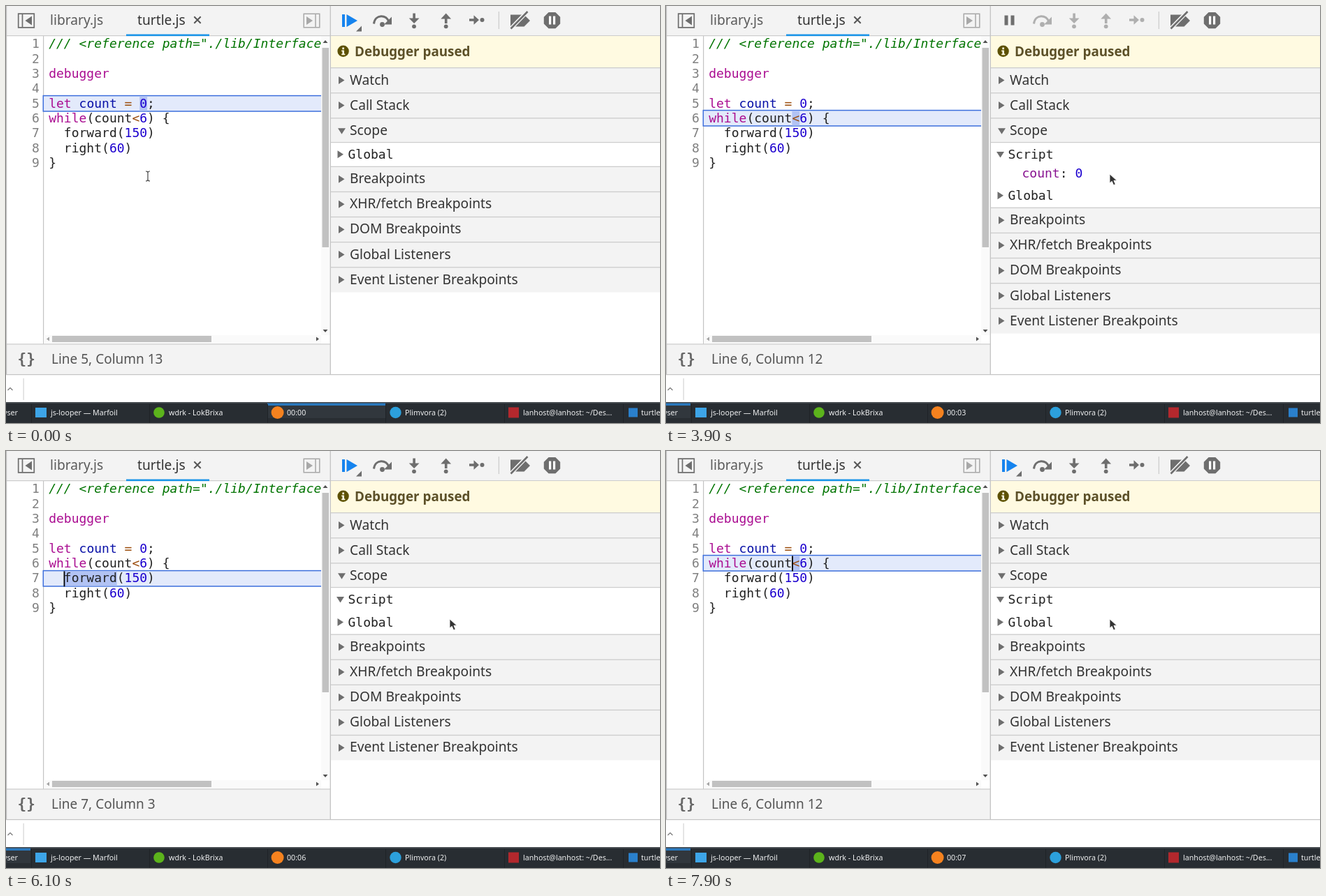
These frames come from a looping animation (936x598 px, 8000 ms). An HTML page:

```html
<!DOCTYPE html>
<html lang="en">
<head>
<meta charset="utf-8">
<title>Debugger stepping</title>
<style>
html, body { margin: 0; width: 100%; height: 100%; overflow: hidden; background: #fff; }
svg { display: block; }
text { white-space: pre; }
.ui { font: 19.2px "Noto Sans", sans-serif; fill: #333; }
.code { font: 18px "DejaVu Sans Mono", monospace; fill: #222; }
.task { font: 10.67px "Noto Sans", sans-serif; fill: #eff0f1; }
.kw { fill: #aa0d91; }
.num { fill: #1c00cf; }
.def { fill: #0a12a8; }
.op { fill: #9a4a08; }
.com { fill: #007400; font-style: oblique; }
.prop { fill: #881391; }
</style>
</head>
<body>
<svg id="stage" width="936" height="598" viewBox="0 0 936 598"></svg>
<script>
const LOOP = 8000, CHAR = 10.836, CODE_X = 61.2, PITCH = 21.33;

// Timelines: [start in ms, value]
const lines = [[0, 5], [900, 6], [4000, 7], [4300, 8], [4500, 6], [4700, 7], [5000, 8],
  [5100, 6], [5300, 7], [5600, 8], [5800, 6], [6000, 7], [6300, 8], [6500, 6],
  [6600, 7], [6800, 8], [7000, 6], [7200, 7], [7400, 8], [7900, 6]];
const scopes = [[0, 'none'], [900, 'full'], [5100, 'bare'], [5200, 'full'],
  [6000, 'bare'], [6200, 'full'], [7900, 'bare']];
const running = [[0, 0], [800, 1], [900, 0], [3900, 1], [4000, 0], [4600, 1],
  [4700, 0], [4900, 1], [5000, 0]];
const carets = [[0, 0], [900, 1], [1400, 0], [1900, 1], [2400, 0], [4000, 1]];
const seconds = [0, 1400, 2200, 3200, 4100, 5200, 6100, 7000].map((t, i) => [t, i]);
const mouse = [[0, [203, 244]], [1500, [228, 245]], [1600, [305, 246]], [1700, [395, 247]],
  [1800, [490, 247]], [1900, [570, 247]], [2000, [607, 247]], [2100, [588, 247]],
  [2200, [561, 247]], [2300, [556, 238]], [2400, [554, 229]], [3200, [602, 234]],
  [3300, [635, 241]]];

// Per code line: first column and length of the marked token
const tokens = { 5: [12, 1], 6: [11, 1], 7: [2, 7], 8: [2, 5] };
const scopeShift = { none: 0, bare: 32.8, full: 59 };

const code = [
  '<tspan class="com">/// &lt;reference path="./lib/Interface</tspan>',
  '',
  '<tspan class="kw">debugger</tspan>',
  '',
  '<tspan class="kw">let</tspan> <tspan class="def">count</tspan> <tspan class="op">=</tspan> <tspan class="num">0</tspan>;',
  '<tspan class="kw">while</tspan>(count<tspan class="op">&lt;</tspan><tspan class="num">6</tspan>) {',
  '  forward(<tspan class="num">150</tspan>)',
  '  right(<tspan class="num">60</tspan>)',
  '}'
];

const rect = (x, y, w, h, fill, more = '') =>
  `<rect x="${x}" y="${y}" width="${w}" height="${h}" fill="${fill}" ${more}/>`;
const dot = (x, y, r, fill) => `<circle cx="${x}" cy="${y}" r="${r}" fill="${fill}"/>`;
const path = (d, more = 'fill="#6e6e6e"') => `<path d="${d}" ${more}/>`;
const text = (x, y, s, cls, more = '') => `<text x="${x}" y="${y}" class="${cls}" ${more}>${s}</text>`;
const stroke = (c, w) => `fill="none" stroke="${c}" stroke-width="${w}"`;
const closed = (x, y) => path(`M${x} ${y - 5.5}l8.5 5.5l-8.5 5.5z`);
const open = (x, y) => path(`M${x} ${y - 4}h11l-5.5 8.5z`);

function header(y, label, isOpen) {
  return rect(465, y, 471, 36, '#f3f3f3') + rect(465, y - .5, 471, 1.3, '#ccc') +
    (isOpen ? open(475, y + 18.5) : closed(476, y + 18)) +
    text(492, y + 24, label, 'ui');
}

function editor() {
  const rows = code.map((s, i) => {
    const y = 60.2 + PITCH * i;
    return text(47.8, y, i + 1, 'code', 'text-anchor="end" style="fill:#808080"') +
      text(CODE_X, y, s, 'code');
  }).join('');
  return rect(53, 43, 1.2, 442, '#c4c4c4') +
    `<clipPath id="clip"><rect x="52" y="43" width="399" height="429"/></clipPath>
    <g clip-path="url(#clip)">
      ${rect(53.3, 0, 420, 22.4, '#e3eafb', 'id="mark" stroke="#3d6fdc" stroke-width="1.5"')}
      ${rect(0, 0, 0, 21.5, '#b2c3f4', 'id="token"')}
    </g>
    <g clip-path="url(#code)">${rows}</g>
    <clipPath id="code"><rect x="0" y="43" width="451" height="429"/></clipPath>
    ${rect(0, 0, 1.8, 22, '#000', 'id="caret"')}` +
    rect(451, 43, 12.5, 429, '#fafafa') + rect(54, 472, 397, 12.5, '#fafafa') +
    rect(452.5, 60, 9.5, 286, '#c1c1c1') + rect(66, 473, 228, 9, '#c1c1c1') +
    path('M453.5 53l3.5-4l3.5 4z', 'fill="#505050"') + path('M453.5 464l3.5 4l3.5-4z', 'fill="#505050"') +
    path('M62 474.5l-4 3l4 3z', 'fill="#a3a3a3"') + path('M444 474.5l4 3l-4 3z', 'fill="#505050"');
}

function chrome() {
  const gray = '#6e6e6e';
  return rect(0, 0, 936, 43, '#f3f3f3') + rect(0, 42, 936, 1.2, '#ccc') +
    rect(0, 485, 464, 43, '#f3f3f3') + rect(0, 484.3, 464, 1.2, '#ccc') +
    rect(0, 0, 1.2, 528, '#bdbdbd') + rect(463.6, 0, 1.4, 528, '#c6c6c6') +
    rect(0, 528, 936, 1.2, '#c4c4c4') +
    path('M17.7 11.2h22.6v19.6h-22.6zM23.5 11v20', stroke(gray, 1.7)) + path('M37 14.5v13l-9.5-6.5z') +
    path('M426.2 11.2h22.6v19.6h-22.6zM443 11v20', stroke('#a8a8a8', 1.5)) +
    path('M430 15v12l9-6z', 'fill="#a8a8a8"') +
    text(63, 27, 'library.js', 'ui', 'style="fill:#5a5a5a"') + text(188, 27, 'turtle.js', 'ui') +
    path('M269.3 15.3l9.4 9.4m0-9.4l-9.4 9.4', stroke('#555', 2)) +
    rect(172, 40.5, 119, 2.6, '#1a94e8') +
    text(16.5, 513, '{}', 'code', 'style="font-size:21px;font-weight:bold;fill:#666"') +
    text(65, 513, '', 'ui', 'id="status" style="font-size:19px;fill:#555"');
}

function toolbar() {
  const gray = '#6e6e6e';
  return `<g id="resume">${rect(481, 12, 4, 18, '#1583ee') + path('M487.5 12l15.5 9l-15.5 9z', 'fill="#1583ee"') +
      path('M509 28.5v8h-8z')}</g>
    <g id="pause">${rect(484.5, 13.5, 5, 14, gray) + rect(493.5, 13.5, 5, 14, gray)}</g>
    <g id="steps">${path('M526.5 25.5C528 11.5 545 11.5 548 23', stroke(gray, 3)) +
      path('M552 15.5v11h-11z') + dot(538.5, 26.5, 3.4, gray) +
      path('M582.3 10.5h3.6v7h5.6l-7.4 7.5l-7.4-7.5h5.6z') + dot(584, 29.3, 2.9, gray) +
      path('M627.9 25v-6.5h-5.6l7.4-8l7.4 8h-5.6v6.5z') + dot(629.7, 29.3, 2.9, gray) +
      path('M663 18.2h6.5v-5l7.5 6.8l-7.5 6.8v-5h-6.5z') + dot(681.5, 20, 3, gray)}</g>` +
    rect(704.8, 8, 1.2, 25, '#ccc') +
    path('M722 12.5h19.5l8.5 8.5l-8.5 8.5h-19.5z') +
    path('M721.5 33.5L746 8', stroke('#f3f3f3', 5.5)) + path('M722.5 32.5L746.5 8', stroke(gray, 2.6)) +
    path('M776.6 9h9.8l6.8 6.8v9.6l-6.8 6.8h-9.8l-6.8-6.8v-9.6z') +
    rect(777, 14.5, 3.2, 12, '#fff') + rect(783, 14.5, 3.2, 12, '#fff');
}

function sidebar() {
  const lower = ['Breakpoints', 'XHR/fetch Breakpoints', 'DOM Breakpoints',
    'Global Listeners', 'Event Listener Breakpoints'];
  return rect(465, 43, 471, 45, '#fffae1') + dot(482.6, 64.8, 8.2, '#5c5000') +
    rect(481.3, 59.5, 2.7, 2.7, '#fffae1') + path('M480.2 63.5h3.8v5h1.3v1.8h-5.1v-1.8h1.2v-3.2h-1.2z', 'fill="#fffae1"') +
    text(499, 71.5, 'Debugger paused', 'ui', 'style="font-size:18.8px;font-weight:bold;fill:#5c5028"') +
    header(88.5, 'Watch') + header(124.6, 'Call Stack') + header(160.7, 'Scope', true) +
    rect(465, 195.5, 471, 215, '#fff') + rect(465, 195, 471, 1.2, '#ccc') +
    `<g id="script">${open(473, 213)}${text(489.5, 219.3, 'Script', 'code')}</g>
    <g id="count">${text(509.5, 246, '<tspan class="prop">count</tspan>: <tspan class="num">0</tspan>', 'code')}</g>
    <g id="lower">${closed(474.5, 212.8)}${text(489.5, 219.3, 'Global', 'code')}
      ${lower.map((s, i) => header(230.2 + 36.1 * i, s)).join('')}</g>`;
}

function taskbar() {
  const active = (id, x, w) => `<g id="${id}">${rect(x, 570, w, 21, '#31373d') + rect(x, 569.6, w, 3.4, '#2a78bd')}</g>`;
  return path('M2.5 551l3.5-3.5l3.5 3.5', stroke('#777', 1.2)) + rect(24.6, 534, 1, 31, '#ccc') +
    rect(0, 568, 936, 30, '#282d32') + rect(0, 568, 936, 2, '#454a4f') +
    active('taskClock', 374, 169) + active('taskWeb', 0, 35) +
    [36, 205, 374, 543, 713, 883].map(x => rect(x, 571, 1, 27, '#1f2327')).join('') +
    text(17, 587.3, 'wser', 'task', 'text-anchor="end"') +
    rect(42, 576, 16, 14, '#3da5e8') + text(64, 587.3, 'js-looper — Marfoil', 'task') +
    dot(219, 583, 7.8, '#5cb41c') + text(233, 587.3, 'wdrk - LokBrixa', 'task') +
    dot(388.6, 583, 9, '#f5821f') + text(402, 587.3, '', 'task', 'id="clock"') +
    dot(557.5, 583, 8.2, '#2ca0dc') + text(571, 587.3, 'Plimvora (2)', 'task') +
    rect(719, 575.5, 15, 15, '#b3282d') + text(740, 587.3, 'lanhost@lanhost: ~/Des...', 'task') +
    rect(891, 576.5, 13, 13, '#2a80cc') + text(909, 587.3, 'turtle.js', 'task');
}

const pointers = `<g id="beam">${path('M-3-7q3 0 3 2q0-2 3-2M0-5v10M-3 7q3 0 3-2q0 2 3 2', stroke('#444', 1.2))}</g>
  <g id="arrow">${path('M0 0v13l3.2-2.7l2.4 5.5l2.6-1.1l-2.3-5.4h4.3z', 'fill="#333" stroke="#fff" stroke-width=".8"')}</g>`;

const $ = id => document.getElementById(id);
$('stage').innerHTML = rect(0, 0, 936, 598, '#fff') + editor() + chrome() + toolbar() + sidebar() + taskbar() + pointers;

const at = (table, t) => table.findLast(step => step[0] <= t)[1];
const show = (id, on) => $(id).setAttribute('visibility', on ? 'visible' : 'hidden');
const set = (id, attrs) => { for (const k in attrs) $(id).setAttribute(k, attrs[k]); };

function draw(t) {
  const line = at(lines, t), scope = at(scopes, t), run = at(running, t);
  const [col, len] = tokens[line];
  const top = 128.6 + Math.round((line - 5) * PITCH);
  const left = CODE_X + col * CHAR;
  set('mark', { y: top });
  set('token', { x: left, y: top + .5, width: len * CHAR });
  set('caret', { x: left - .3, y: top + .8 });
  show('caret', at(carets, t));
  $('status').textContent = `Line ${line}, Column ${col + 1}`;

  show('resume', !run);
  show('pause', run);
  set('steps', { opacity: run ? .5 : 1 });

  show('script', scope !== 'none');
  show('count', scope === 'full');
  set('lower', { transform: `translate(0 ${scopeShift[scope]})` });

  show('taskClock', t < 300);
  show('taskWeb', t >= 300);
  $('clock').textContent = '00:0' + at(seconds, t);

  const [x, y] = at(mouse, t), inCode = x < 451;
  show('beam', inCode);
  show('arrow', !inCode);
  set(inCode ? 'beam' : 'arrow', { transform: `translate(${x} ${y})` });
}

const start = performance.now();
function tick() {
  draw((performance.now() - start) % LOOP);
  requestAnimationFrame(tick);
}
tick();
</script>
</body>
</html>
```
